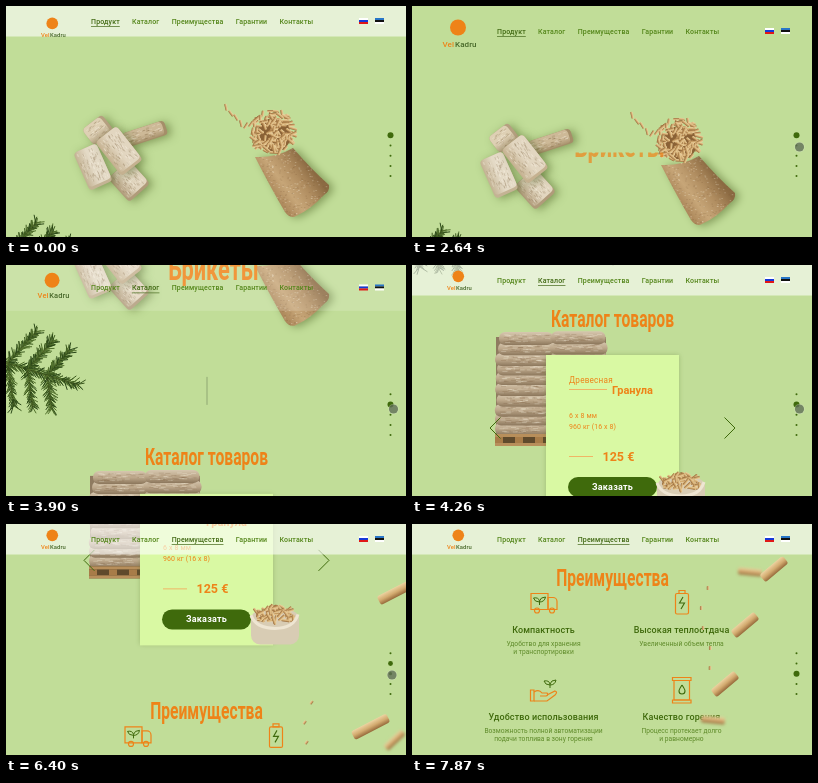
An HTML page with a canvas that plays this animation: 400x231 px, repeating every 7990 ms.

```html
<!DOCTYPE html>
<html lang="ru">
<head>
<meta charset="utf-8">
<style>
html, body { margin: 0; width: 400px; height: 231px; overflow: hidden; background: #c1dd98; }
canvas { display: block; }
</style>
</head>
<body>
<canvas id="stage" width="400" height="231"></canvas>
<script>
const LOOP = 7990, PAGE2 = 297, PAGE3 = 557;
const ORANGE = '#ee8318', GREEN = '#3f6a0c', SOFT = '#5f8b2a';
const c = document.getElementById('stage').getContext('2d');

const ramp = (t, a, b) => Math.min(1, Math.max(0, (t - a) / (b - a)));
const ease = p => p * (2 - p);
const lerp = (a, b, p) => a + (b - a) * p;
const rad = deg => deg * Math.PI / 180;

let seed = 1;
const rnd = () => (seed = seed * 16807 % 2147483647) / 2147483647;
const between = (a, b) => lerp(a, b, rnd());

function layer(draw) {
  c.save();
  draw();
  c.restore();
}

function text(s, x, y, size, color, { weight = 400, align = 'left', gap = 0, narrow = 1 } = {}) {
  let width;
  layer(() => {
    c.translate(x, y);
    c.scale(narrow, 1);
    c.font = `${weight} ${size}px Roboto, sans-serif`;
    c.letterSpacing = gap + 'px';
    c.textAlign = align;
    c.fillStyle = color;
    c.fillText(s, 0, 0);
    width = c.measureText(s).width;
  });
  return width;
}

const title = (s, x, y, size = 23) =>
  text(s, x, y, size, ORANGE, { weight: 600, align: 'center', narrow: .68 });

function rect(x, y, w, h, color) {
  c.fillStyle = color;
  c.fillRect(x, y, w, h);
}

function round(x, y, w, h, r, color) {
  c.beginPath();
  c.roundRect(x, y, w, h, r);
  c.fillStyle = color;
  c.fill();
}

function frame(x, y, w, h, r = 0) {
  c.beginPath();
  c.roundRect(x, y, w, h, r);
  c.stroke();
}

function disc(x, y, r, color) {
  c.beginPath();
  c.arc(x, y, r, 0, 7);
  c.fillStyle = color;
  c.fill();
}

function line(color, width, d) {
  c.strokeStyle = color;
  c.lineWidth = width;
  c.stroke(new Path2D(d));
}

function blend(x0, y0, x1, y1, ...colors) {
  const g = c.createLinearGradient(x0, y0, x1, y1);
  colors.forEach((color, i) => g.addColorStop(i / (colors.length - 1), color));
  return g;
}

function shadow() {
  c.shadowColor = 'rgba(70,90,30,.5)';
  c.shadowBlur = 8;
  c.shadowOffsetX = 4;
  c.shadowOffsetY = 1;
}

function grain(x, y, w, h, n, len) {
  for (let i = 0; i < n; i++)
    rect(between(x, x + w - len), between(y, y + h), len, .8, i % 2 ? 'rgba(110,80,45,.22)' : 'rgba(255,250,235,.3)');
}

function brick(x, y, w, h, angle, light, dark) {
  layer(() => {
    c.translate(x, y);
    c.rotate(rad(angle));
    layer(() => {
      shadow();
      round(-w / 2, -h / 2, w, h, 4, dark);
    });
    round(-w / 2, -h / 2, w - 3, h - 1, 4, blend(0, -h / 2, 0, h / 2, light, light, dark));
    grain(-w / 2 + 2, -h / 2 + 2, w - 6, h - 5, w * h / 10, 3);
  });
}

function bricks() {
  brick(139, 136, 44, 15, -18, '#cdb997', '#a58e69');
  brick(92, 132, 25, 20, -38, '#ded0b4', '#b5a080');
  brick(123, 183, 32, 28, 48, '#e2d6bf', '#b09b7a');
  brick(87, 169, 41, 25, 66, '#e4dac6', '#c4b394');
  brick(113, 153, 43, 27, 52, '#e2d6c0', '#c5b190');
}

function chip(x, y, len, w, angle, blur = 0) {
  layer(() => {
    c.translate(x, y);
    c.rotate(rad(angle));
    if (blur) c.filter = `blur(${blur}px)`;
    round(-len / 2, -w / 2, len, w, w / 4, blend(0, -w / 2, 0, w / 2, '#ecd2a0', '#d3ab70', '#96693a'));
  });
}

function heap(x, y, rx, ry, n) {
  for (let i = 0; i < n; i++) {
    const a = between(0, 6.28), r = Math.sqrt(rnd());
    chip(x + rx * r * Math.cos(a), y + ry * r * Math.sin(a), between(5, 9), 2.6, between(0, 180));
  }
}

function sack() {
  const body = new Path2D('M249 159Q270 160 287 150Q306 172 323 187Q324 193 318 197Q304 212 290 218Q284 221 279 214Q266 192 249 159Z');
  layer(() => {
    shadow();
    c.fillStyle = blend(268, 200, 306, 172, '#a98457', '#c7a678', '#b08d60', '#8b6a42');
    c.fill(body);
    c.shadowColor = 'transparent';
    c.clip(body);
    grain(248, 150, 77, 70, 450, 1.5);
  });
  disc(268, 137, 17, '#8a6236');
  heap(267, 134, 22, 21, 150);
  for (let i = 0; i < 6; i++)
    chip(220 + i * 5, 114 + i * 2.5 + between(-5, 5), 7, 2.3, between(20, 140));
}

// Stem with needles; side twigs repeat the same rule
function twig(x, y, dir, len, depth) {
  const dx = Math.cos(rad(dir)), dy = Math.sin(rad(dir));
  const ray = (px, py, a, l, color, w) =>
    line(color, w, `M${px} ${py}l${l * Math.cos(rad(a))} ${l * Math.sin(rad(a))}`);
  ray(x, y, dir, len, '#5f5626', 1.4);
  for (let s = 0; s < len; s += 1.1) for (const side of [-1, 1])
    ray(x + dx * s, y + dy * s, dir + side * between(20, 55), between(4, 10),
      ['#3c5a1f', '#51702c', '#2b4818'][Math.floor(rnd() * 3)], 1);
  if (depth) for (const at of [.1, .35, .6]) for (const side of [-1, 1])
    twig(x + dx * len * at, y + dy * len * at, dir + side * 65, len * .55 * (1 - at * .4), depth - 1);
}

function pallet() {
  rect(84, 72, 110, 98, '#8f7b60');
  for (let row = 9; row >= 0; row--) for (let k = 0; k < 2; k++) {
    const x = 82 + k * 55 + between(0, 5), y = 68 + row * 10 - k + between(-1, 1);
    round(x, y, between(54, 58), 13, 6, blend(0, y, 0, y + 13, '#d6c7af', '#bda88b', '#8c775c'));
    grain(x + 3, y + 2, 50, 8, 40, 5);
  }
  rect(83, 169, 112, 12, '#5f4a2c');
  for (const y of [169, 178]) rect(83, y, 112, 3, '#b88f5b');
  for (let x = 83; x < 190; x += 20) rect(x, 172, 8, 6, '#a87c48');
}

function catalog() {
  title('Каталог товаров', 200.5, 61.5);
  pallet();
  layer(() => {
    c.shadowColor = 'rgba(80,110,30,.3)';
    c.shadowBlur = 5;
    rect(134, 90, 133, 158, '#d9f9a3');
  });
  text('Древесная', 157, 117.5, 8.2, ORANGE, { gap: .2 });
  rect(157, 124, 38, 1, '#f0b565');
  text('Гранула', 200, 128.5, 11, ORANGE, { weight: 700 });
  text('6 x 8 мм', 157, 152.5, 7, ORANGE, { gap: .15 });
  text('960 кг (16 x 8)', 157, 163.5, 7, ORANGE, { gap: .1 });
  rect(157, 191, 24, 1, '#f0b565');
  text('125 €', 190.5, 196, 12.5, ORANGE, { weight: 700 });
  round(156, 212, 89, 20, 10, GREEN);
  text('Заказать', 200.5, 225, 9, '#fff', { weight: 700, align: 'center', gap: .2 });
  for (const side of [-1, 1])
    line(GREEN, 1, `M${200.5 + side * 112} 152.5l${side * 10.5} 10.5l${-side * 10.5} 10.5`);
  round(245, 213, 48, 34, 9, '#d8ccb4');
  heap(269, 217, 21, 8, 60);
  line('#eee5d2', 3, 'M245 218Q250 231 269 231T292 217');
}

function leaf(x, y) {
  layer(() => {
    c.translate(x, y);
    line(GREEN, 1, 'M0 8V4Q1 0 6 0Q5 5 0 5Q-5 5 -6 1Q-1 0 0 4');
  });
}

function icons() {
  c.strokeStyle = ORANGE;
  c.lineWidth = 1.2;
  frame(119, 69.5, 17, 16);
  frame(136, 73.5, 9, 12, [0, 4, 0, 0]);
  for (const x of [125, 140]) frame(x - 2.5, 84, 5, 5, 2.5);
  frame(263.5, 69.5, 13, 20.5, 1.5);
  frame(267, 66.5, 6, 3);
  frame(118.5, 166, 3.5, 11);
  line(ORANGE, 1.2, 'M122 168Q127 165 130 169H135Q137 171 134 172H128M135 171L143 167Q146 168 143 171L135 177H122');
  for (const y of [153.5, 176]) frame(260.5, y, 18.5, 3);
  frame(262, 156.5, 15.5, 19.5);
  line(GREEN, 1.1, 'M271 73l-3.5 6h5l-3.5 6M270 161q3 4.5 3 6a3 3 0 0 1-6 0q0-1.5 3-6');
  leaf(127.5, 73);
  leaf(138, 156);
}

function benefits(t) {
  title('Преимущества', 200.5, 61.5);
  icons();
  ['Компактность|Удобство для хранения|и транспортировки',
   'Высокая теплоотдача|Увеличенный объем тепла',
   'Удобство использования|Возможность полной автоматизации|подачи топлива в зону горения',
   'Качество горения|Процесс протекает долго|и равномерно'
  ].forEach((block, i) => {
    const [head, ...lines] = block.split('|');
    const x = 131.5 + i % 2 * 138, y = 108.5 + Math.floor(i / 2) * 87;
    text(head, x, y, 9, GREEN, { weight: 500, align: 'center', gap: .1 });
    lines.forEach((s, k) => text(s, x, y + 13.8 + k * 8, 6.7, SOFT, { align: 'center' }));
  });
  flight(Math.max(-1, (t - 6940) / 930));
}

// Tumbling chips, near ones sharp and far ones blurred, among small specks
function flight(p) {
  [[353, 81, 333, 101], [370, 70, 338, 48], [312, 163, 313, 160], [317, 205, 301, 196], [380, -25, 362, 45]]
    .forEach(([x0, y0, x1, y1], i) => {
      const far = i % 2;
      chip(lerp(x0, x1, p), lerp(y0, y1, p), far ? 24 : 36 - 6 * p, far ? 7 : 9.5,
        far ? lerp(-25, 6, p) : -32 - 8 * p, far ? 1.4 : .3);
    });
  for (let i = 0; i < 5; i++)
    chip(between(275, 310) - 6 * p, 52 + i * 20 + 12 * p, 4, 2.5, 90 * p, .7);
}

function heroTitle(t) {
  if (t < 2600) return;
  const p = ease(ramp(t, 2640, 3600));
  layer(() => {
    c.beginPath();
    c.rect(150, 146.5, 120, 45);
    c.clip();
    c.globalAlpha = lerp(.7, 1, p);
    title('Брикеты', 207.5, lerp(150.5, 173.5, p), 32);
  });
}

function header(t) {
  const small = 1 - ramp(t, 110, 510) + ramp(t, 3800, 4200);
  const rise = .58 * (1 - ramp(t, 110, 240)) + ramp(t, 3780, 4020);
  rect(0, 0, 400, lerp(51, 30.5, small), `rgba(255,255,255,${.6 * small})`);

  layer(() => {
    c.translate(47, lerp(37.5, 23, rise));
    const k = lerp(1, .73, small);
    c.scale(k, k);
    disc(-1, -16, 8, ORANGE);
    text('Vel', -16.5, 3, 8, ORANGE, { weight: 500, gap: .1 });
    text('Kadru', -4, 3, 8, '#48682a', { weight: 500, gap: .1 });
  });

  const y = lerp(25.5, 15.5, small);
  const active = t < 3600 ? 0 : t < 6110 ? 1 : 2;
  let x = 85;
  ['Продукт', 'Каталог', 'Преимущества', 'Гарантии', 'Контакты'].forEach((s, i) => {
    const w = text(s, x, y + 2.5, 7, i === active ? '#426a14' : '#54861a', { weight: 500, gap: .15 });
    if (i === active) rect(x, y + 4.5, w, .8, '#587a30');
    x += w + 12.2;
  });
  [['#fff', '#1638d8', '#e01818'], ['#2876c8', '#111', '#fff']].forEach((flag, k) =>
    flag.forEach((color, i) => rect(353 + k * 16, y - 3.5 + i * 2, 9, 2, color)));
}

function dots(t) {
  const at = ramp(t, 3720, 3880) + ramp(t, 6350, 6520);
  for (let i = 0; i < 5; i++)
    disc(384.5, 129.3 + i * 10.2, 1 + 2 * Math.max(0, 1 - Math.abs(at - i)), GREEN);
}

function pointer(t) {
  if (t < 1310 || t > 7210) return;
  const enter = ramp(t, 1310, 1980), settle = ramp(t, 4260, 4900), leave = ramp(t, 6940, 7210);
  const x = lerp(362, 387.5, enter) - 1.5 * settle + 8 * leave;
  const y = lerp(134, 141, enter) + 3 * ramp(t, 2640, 3900) + 7 * settle;
  disc(x, y, 5.2, 'rgba(225,235,210,.4)');
  disc(x, y, 4.6, 'rgba(70,85,62,.66)');
}

function draw(t) {
  seed = 77;
  const scroll = 8 * (1 - ramp(t, 110, 240)) + PAGE2 * ease(ramp(t, 3735, 4260)) +
    (PAGE3 - PAGE2) * ease(ramp(t, 6235, 6820));
  rect(0, 0, 400, 231, '#c1dd98');
  layer(() => {
    c.translate(0, -scroll);
    bricks();
    sack();
    heroTitle(t);
    twig(-6, 254, 17, 82, 1);
    rect(200.5, 270, 1, 28, '#8fa873');
    c.translate(0, PAGE2);
    if (t > 3600) catalog();
    c.translate(0, PAGE3 - PAGE2);
    if (t > 6100) benefits(t);
  });
  header(t);
  dots(t);
  pointer(t);
}

const start = performance.now();
function tick() {
  draw((performance.now() - start) % LOOP);
  requestAnimationFrame(tick);
}
tick();
</script>
</body>
</html>
```
